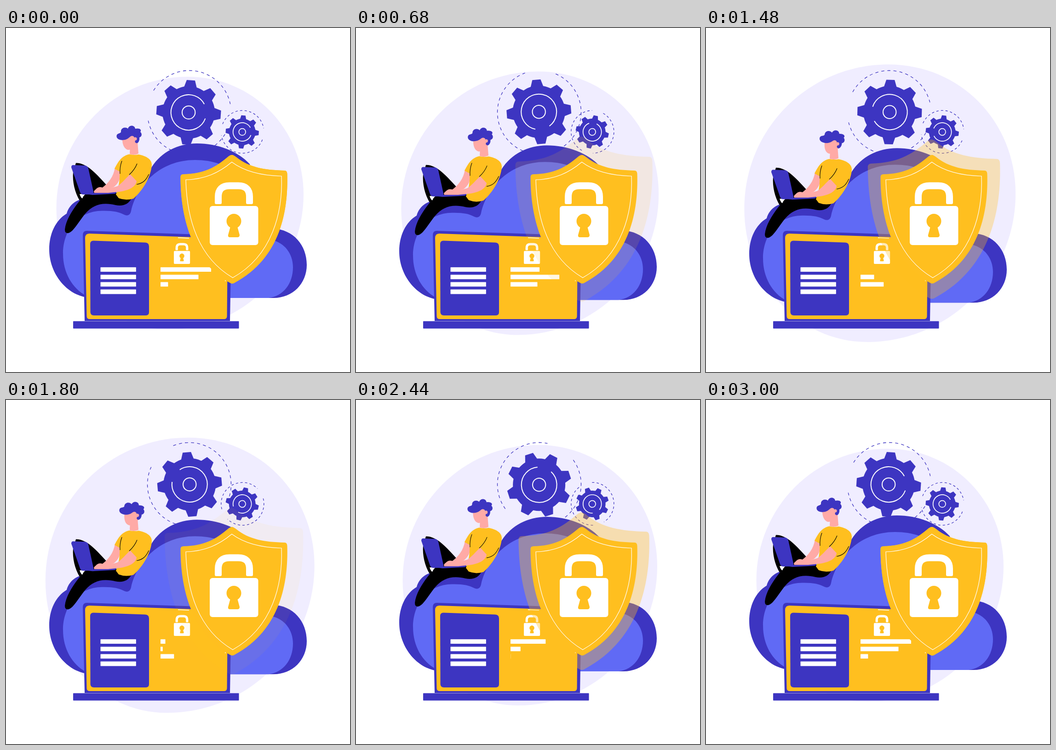
Animation of 748 by 748 pixels, one loop 3.04 s. Source, as an HTML page with a canvas:

```html
<!DOCTYPE html>
<html lang="en">
<head>
<meta charset="utf-8">
<title>Cloud security</title>
<style>
html, body { margin: 0; width: 100%; height: 100%; overflow: hidden; background: #fff; }
canvas { display: block; width: 748px; height: 748px; }
</style>
</head>
<body>
<canvas id="stage"></canvas>
<script>
const SIZE = 748, LOOP = 3040, CYCLE = 3000, STEP = 40, TAU = Math.PI * 2;
const DARK = '#3d35c1', LIGHT = '#606af5', GOLD = '#ffbf1f', PALE = '#f0edff',
      SKIN = '#ffaaa6', WHITE = '#fff', BLACK = '#000';

const canvas = document.getElementById('stage');
const ctx = canvas.getContext('2d');
const dpr = window.devicePixelRatio || 1;
canvas.width = canvas.height = Math.round(SIZE * dpr);

const P = d => new Path2D(d);
const rad = deg => deg * Math.PI / 180;

const shapes = {
  backdrop: P('M395 106C537 106 647 219 647 362C647 524 515 656 352 656C218 656 109.500 538 109.500 392C109.500 234 237 106 395 106Z'),
  cloud: P('M172 585C130 577 94 533 94 481C94 447 108 418 132 403.500C136 388 149 374 170 371L262 372C285 362 299 337 317 302C338 270 373 251 415 251C460 251 505 268 530 296L580 436C625 438 654 472 654 515C654 556 623 587 582 587H172Z'),
  cloudIn: P('M174 582C144 566 124 532 124 491C124 440 156 398 209 397.5C232 397 246 400 255 405C264 410 270 407 272 398C285 341 335 287 411 287C450 287 480 298 505 320L578 461C606 467 624 491 624 520C624 556 603 583 571 587H174Z'),
  shield: P('M491 276C494 276 497 278 501 281C528 303 562 309 606 310Q611 310 611.5 317C614 395 598 500 497 554Q492 557 487 554C408 510 380 420 379.5 325Q379 318 386 318C430 317 455 304 484 279Q488 276 491 276Z'),
  shieldLine: P('M491 291.5C520 313 556 321 599 322C602 400 580 494 493 543C418 499 393 415 391 330C432 329 463 315 491 291.5Z'),
  screen: P('M176 441L480 451Q490 452 490 462L487 637H171L167 450Q167 441 176 441Z'),
  screenIn: P('M181 447L470 457Q482 458 482 470L480.500 627Q480 633 474 633H182Q176 633 175.500 627L172 457Q172 447 181 447Z'),
  panel: P('M190 462.500L303 466.500Q311 467 311 475V618Q311 625 304 625H191Q184 625 183.500 618L183 470Q183 462.500 190 462.500Z'),
  backLeg: P('M152 293.500C176 293 196 317 223 346L208 356L186 362L160 375C150 358 144 335 146 313Z'),
  gap: P('M160 361L173 361Q168 365 166 371Q162 368 160 361Z'),
  frontLeg: P('M273 370C266 384 254 388 238 385C210 378 189 384 172 404C156 424 146 444 135 446Q128 447 128 438C130 419 143 398 156 381C165 368 177 361 194 361L243 358Z'),
  lid: P('M146 298L172 299Q177 300 179 305L190 355Q191 362 185 362H168Q163 362 161 357L142 303Q142 298 146 298Z'),
  deck: P('M166 360L240 355.500Q241 359 236 360.500L188 363Z'),
  farArm: P('M237 303L250 311C249 329 244 339 234 346L218 352L207 349C222 338 234 324 237 303Z'),
  shirt: P('M268 274.500Q278 277 288 275C304 278 317 285 317 297C316 322 298 353 277 371Q260 376 245 370L239 362C245 347 248 330 247 312L236 306C243 292 251 278 268 274.500Z'),
  nearArm: P('M270 318L284 333C282 345 269 353 246 356L222 358.500H192Q189 355 195 351Q201 344 210 347L220 350L242 344C253 337 260 327 270 318Z'),
  folds: P('M252 289Q247 302 248 317M285 295Q280 308 268 319M310.500 318C304 332 297 338 284 340'),
  neck: P('M270 252L286 247L288 273Q279 278 269 274Z'),
  face: P('M253 238C252 252 257 264 266 265C276 265 284 255 286 244L282 230H257Z'),
  hair: P('M240.500 234C242 228 249 230 250 226C249 217 260 214 265 219C268 210 280 211 281 219C290 217 296 221 292 226C297 230 295 237 290 238C291 244 288 250.500 284 250.500Q279 249 281 245L278 236Q273 232 268 238C259 247 239 245 240.500 234Z'),
  shackle: P('M461.500 376V367Q461.500 343 486 343H505Q529.500 343 529.500 367V376'),
  keyhole: P('M489 428H502L508 450Q508 455 503 455H487Q482 455 483 450Z')
};

function fill(path, color) {
  ctx.fillStyle = color;
  ctx.fill(path);
}
function line(path, color, width) {
  ctx.strokeStyle = color;
  ctx.lineWidth = width;
  ctx.stroke(path);
}
function box(x, y, w, h, color, r = 0.6) {
  ctx.fillStyle = color;
  ctx.beginPath();
  ctx.roundRect(x, y, w, h, Math.min(r, w / 2));
  ctx.fill();
}
function disc(x, y, r, color) {
  ctx.fillStyle = color;
  ctx.beginPath();
  ctx.arc(x, y, r, 0, TAU);
  ctx.fill();
}
function arc(x, y, r, from, to, color, width) {
  ctx.strokeStyle = color;
  ctx.lineWidth = width;
  ctx.beginPath();
  ctx.arc(x, y, r, rad(from), rad(to));
  ctx.stroke();
}
function scaleAt(x, y, k) {
  ctx.translate(x, y);
  ctx.scale(k, k);
  ctx.translate(-x, -y);
}

function backdrop(swell) {
  ctx.save();
  scaleAt(378.5, 381, 1 + 0.0975 * swell);
  fill(shapes.backdrop, PALE);
  ctx.restore();
}

// Two dashed arcs with opposite openings
function orbit(x, y, r, turn, open, dash) {
  ctx.setLineDash([dash, dash]);
  for (const side of [0, 180])
    arc(x, y, r, turn + side + open / 2, turn + side + 180 - open / 2, DARK, 1.3);
  ctx.setLineDash([]);
}

function gear(x, y, turn, g) {
  ctx.save();
  ctx.translate(x, y);
  ctx.rotate(rad(turn));
  disc(0, 0, g.body, DARK);
  for (let i = 0; i < 8; i++) {
    ctx.save();
    ctx.rotate(rad(4 + i * 45));
    ctx.beginPath();
    ctx.moveTo(g.body - 3, -g.foot);
    ctx.lineTo(g.tip, -g.top);
    ctx.lineTo(g.tip, g.top);
    ctx.lineTo(g.body - 3, g.foot);
    ctx.fill();
    ctx.restore();
  }
  arc(0, 0, g.ring, 20, 332, WHITE, g.line);
  arc(0, 0, g.hub, 0, 360, WHITE, g.line);
  ctx.restore();
}
const BIG = { body: 57, tip: 70, foot: 14, top: 9, ring: 38.5, hub: 14.2, line: 2 };
const SMALL = { body: 29, tip: 36, foot: 7, top: 4.6, ring: 20, hub: 7.4, line: 1.7 };

function person(swell) {
  const s = shapes;
  fill(s.backLeg, BLACK);
  fill(s.gap, WHITE);
  fill(s.frontLeg, BLACK);
  fill(s.farArm, SKIN);
  fill(s.neck, SKIN);
  fill(s.shirt, GOLD);
  fill(s.lid, DARK);
  fill(s.deck, DARK);
  fill(s.nearArm, SKIN);
  line(s.folds, BLACK, 1.1);
  ctx.save();
  ctx.translate(280, 272);
  ctx.rotate(rad(9.5 * swell));
  ctx.translate(-280, -272);
  fill(s.face, SKIN);
  fill(s.hair, DARK);
  disc(281, 241, 3.6, SKIN);
  ctx.restore();
}

function lock() {
  line(shapes.shackle, WHITE, 15);
  box(454, 370, 15, 13, WHITE, 3);
  box(522, 370, 15, 13, WHITE, 3);
  box(443, 387, 105.5, 85, WHITE, 6);
  disc(495.5, 420, 16, GOLD);
  fill(shapes.keyhole, GOLD);
}

function laptop(wave) {
  const s = shapes;
  fill(s.screen, DARK);
  fill(s.screenIn, GOLD);
  fill(s.panel, DARK);
  for (let i = 0; i < 4; i++) box(205.5, 520.3 + i * 16.1, 77.3, 9.8, WHITE);
  line(P('M374 456L398 457'), WHITE, 1.4);
  disc(477, 549.5, 1, WHITE);
  ctx.save();
  ctx.translate(382.5, 513);
  ctx.scale(0.333, 0.333);
  ctx.translate(-495.5, -472);
  lock();
  ctx.restore();
  [110, 110, 65.5].forEach((full, i) => {
    box(336, 520.3 + i * 16.1, full * (1 + Math.cos(wave - i * TAU / 6)) / 2, 9.8, WHITE, 0.4);
  });
  box(146, 637.5, 360.5, 16, DARK, 1);
}

// y of the curve (0.25, 0.1, 0.25, 1) at x
function ease(x) {
  const bez = (a, b, u) => 3 * a * u * (1 - u) ** 2 + 3 * b * u * u * (1 - u) + u ** 3;
  let lo = 0, hi = 1;
  for (let i = 0; i < 20; i++) {
    const mid = (lo + hi) / 2;
    if (bez(0.25, 0.25, mid) < x) lo = mid; else hi = mid;
  }
  return bez(0.1, 1, lo);
}

function pulse(p) {
  ctx.save();
  ctx.globalAlpha = (1 - p) ** 1.8;
  scaleAt(495.5, 416, 1 + 0.305 * ease(p));
  fill(shapes.shield, GOLD);
  ctx.restore();
}

function draw(t) {
  const phase = t / CYCLE % 1, wave = phase * TAU, turn = phase * 360;
  const swell = (1 - Math.cos(wave)) / 2;
  ctx.setTransform(dpr, 0, 0, dpr, 0, 0);
  ctx.fillStyle = WHITE;
  ctx.fillRect(0, 0, SIZE, SIZE);

  backdrop(swell);
  orbit(398.5, 183.5, 91, 190 + turn, 43, 6.6);
  orbit(514.3, 225.8, 46.5, 6 - turn, 31, 5);
  const drift = wave + rad(160);
  gear(398.2 + 1.1 * Math.cos(drift), 183.2 + 1.1 * Math.sin(drift), turn, BIG);
  gear(513.7, 226, -turn, SMALL);

  ctx.save();
  ctx.translate(0, 10.2 * swell);
  fill(shapes.cloud, DARK);
  fill(shapes.cloudIn, LIGHT);
  person(swell);
  ctx.restore();

  laptop(wave);
  pulse(phase * 3 % 1);
  fill(shapes.shield, GOLD);
  line(shapes.shieldLine, WHITE, 1.2);
  lock();
}

const start = performance.now();
function tick() {
  const ms = Math.max(0, performance.now() - start) % LOOP;
  draw(Math.floor(ms / STEP) * STEP);
  requestAnimationFrame(tick);
}
tick();
</script>
</body>
</html>
```
